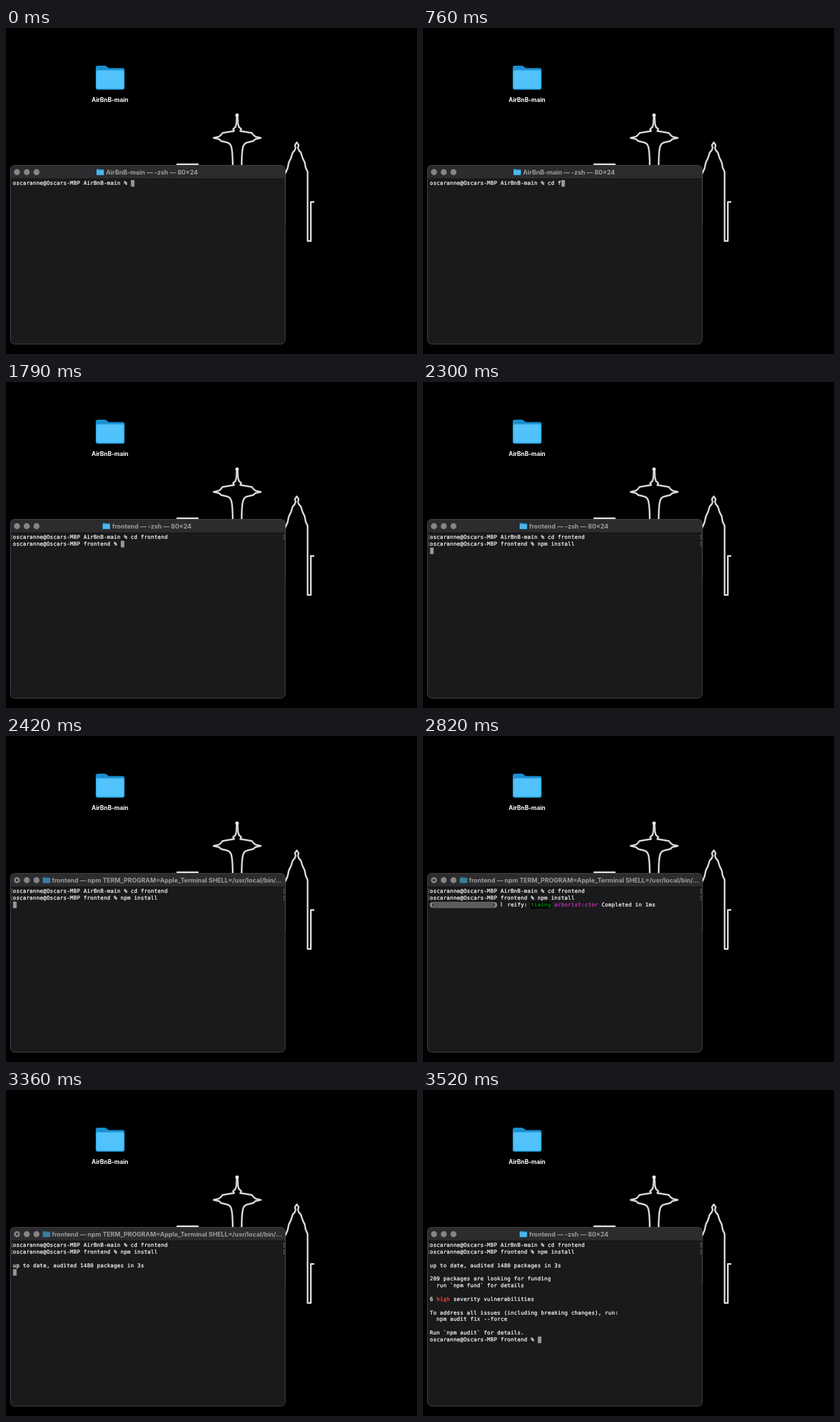
Recreate the animation shown at these times as an HTML page. Size 600 by 476 pixels, loop 3610 ms.

```html
<!DOCTYPE html>
<html lang="en">
<head>
<meta charset="utf-8">
<title>Terminal session</title>
<style>
  html, body { margin: 0; width: 100%; height: 100%; overflow: hidden; background: #000; }
  #stage { position: relative; width: 600px; height: 476px; overflow: hidden; background: #000; }
  svg { position: absolute; left: 0; top: 0; }
  .label, .title { font-family: Inter, sans-serif; font-weight: 700; }
  .label { font-size: 8.6px; fill: #fff; }
  .title { font-size: 9.15px; fill: #9d9c9e; }
  #screen span {
    position: absolute; white-space: pre; color: #fff;
    font: 7.8px/9.857px "DejaVu Sans Mono", monospace;
    letter-spacing: calc(4.915px - 1ch);
    -webkit-text-stroke: .22px currentColor;
  }
  #screen .mark { color: #7c7c7c; -webkit-text-stroke: 0; }
  #screen .bold { font-weight: 700; }
  #screen .red { color: #d23a2c; font-weight: 700; }
  #screen .green { color: #0a8f1c; background: #000; }
  #screen .pink { color: #cb32cb; }
  #screen .spin { font-family: "DejaVu Sans", sans-serif; letter-spacing: 0; }
  #cursor { fill: #979797; }
</style>
</head>
<body>
<div id="stage">
  <svg width="600" height="476" viewBox="0 0 600 476">
    <defs>
      <linearGradient id="front" x2="0" y2="1">
        <stop offset="0" stop-color="#53c3fb"/>
        <stop offset="1" stop-color="#4fc2fc"/>
      </linearGradient>
      <g id="folder">
        <path d="M0 3Q0 0 3 0H13Q15 0 16.5 1.500L17.500 2.500Q18.500 3.400 20 3.400H39Q42 3.400 42 6.400V32Q42 35 39 35H3Q0 35 0 32Z" fill="#1b8fd0"/>
        <rect x=".7" y="6.600" width="40.600" height="27.400" rx="2.600" fill="url(#front)" stroke="#2fa6e6" stroke-width="1.400"/>
      </g>
      <path id="half" d="M337 128L336.300 140L335 144.500L331.500 147.800L333 150.500L328 151.200L316 153.300L313.500 156.500L310.500 158.800L303 160.500L311 162.300L314 165L323 167.200Q328 168.500 329.300 175Q331 183 331 203"/>
      <g id="skyline">
        <use href="#half"/>
        <use href="#half" transform="matrix(-1 0 0 1 675 0)"/>
        <path d="M250 205V199H280V205"/>
        <path d="M407 214L411 205L413 196L416 190L418.500 182L421.500 178.500L422.800 175L421.800 171L424.500 167L427.200 171L426.200 175L427.500 178.500L430.500 182L433 190L436 196L437.500 204L440.300 210V311H445V254H450"/>
      </g>
    </defs>

    <g fill="none" stroke-linejoin="round">
      <use href="#skyline" stroke="#3a3a3a" stroke-width="3.400"/>
      <use href="#skyline" stroke="#e4e4e4" stroke-width="2"/>
    </g>
    <circle cx="337.300" cy="127.200" r="2.500" fill="#ececec"/>
    <path d="M408 285V212" stroke="#3c3c3c"/>

    <use href="#folder" x="131" y="55"/>
    <text class="label" x="151.800" y="107.800" text-anchor="middle">AirBnB-main</text>

    <rect x="6.500" y="200.500" width="401" height="261" rx="6" fill="#1a191b"/>
    <path d="M6.500 220V206.500Q6.500 200.500 12.500 200.500H401.500Q407.500 200.500 407.500 206.500V220Z" fill="#2c2b2d"/>
    <path d="M7 220.200H407" stroke="#0c0c0c" stroke-width=".6"/>
    <rect x="6.500" y="200.500" width="401" height="261" rx="6" fill="none" stroke="#414042"/>
    <g fill="#858486">
      <circle cx="16" cy="210.500" r="4.400"/>
      <circle cx="30.300" cy="210.500" r="4.400"/>
      <circle cx="44.500" cy="210.500" r="4.400"/>
    </g>
    <circle id="dot" cx="16" cy="210.500" r="1.700" fill="#29282a"/>
    <use id="icon" href="#folder"/>
    <text id="title" class="title" y="213.600"></text>

    <rect id="cursor" width="5.200" height="9.600"/>
    <g id="bar">
      <rect x="14.900" y="242" width="88.500" height="9.300" fill="#5c5c5c"/>
      <rect id="fill" x="14.900" y="242" height="9.300" fill="#e6e6e6"/>
      <path d="M12.700 242.800Q8.600 246.700 12.700 250.600M14.600 242.800Q10.600 246.700 14.600 250.600M105.600 242.800Q109.700 246.700 105.600 250.600M103.700 242.800Q107.700 246.700 103.700 250.600" fill="none" stroke="#fff" stroke-width=".9"/>
    </g>
  </svg>
  <div id="screen"></div>
</div>

<script>
const LOOP = 3610, CELL = 4.915, LINE = 9.857, LEFT = 10, TOP = 222;
const $ = id => document.getElementById(id);

const home = "oscaranne@Oscars-MBP AirBnB-main % ";
const sub = "oscaranne@Oscars-MBP frontend % ";

// text, icon x, text x
const titles = {
  home: ["AirBnB-main — -zsh — 80×24", 132, 146],
  sub: ["frontend — -zsh — 80×24", 141, 155],
  npm: ["frontend — npm TERM_PROGRAM=Apple_Terminal SHELL=/usr/local/bin/…", 53.7, 67]
};

const steps = [];
let state = { title: "home", marks: 0, lines: [home], runs: [], bar: null, dot: false };
const at = (t, change = {}) => {
  state = { ...state, ...change };
  steps.push({ t, ...state });
};
const type = (prompt, above, keys) =>
  keys.forEach(([t, text]) => at(t, { lines: [...above, prompt + text] }));

at(0);
type(home, [], [
  [240, "c"], [310, "cd"], [390, "cd "],
  [760, "cd f"], [810, "cd fr"], [860, "cd fro"], [910, "cd fron"],
  [970, "cd front"], [1020, "cd fronte"], [1070, "cd frontend/"]
]);
at(1120, { marks: 1 });

const first = home + "cd frontend";
at(1390, { lines: [first, ""] });
at(1420, { title: "sub", lines: [first, sub] });
type(sub, [first], [[1820, "n"], [1880, "npm i"], [1970, "npm install"]]);

const both = [first, sub + "npm install"];
at(2300, { marks: 2, lines: [...both, ""] });
at(2360, { title: "npm" });
at(2390, { dot: true });

const timing = (phase, task, time) => {
  const col = 23 + phase.length + 1;
  return [
    [23, 2, phase],
    [col, 2, "timing", "green"],
    [col + 7, 2, task, "pink"],
    [col + 8 + task.length, 2, "Completed in " + time]
  ];
};
at(2820, { bar: 0, runs: timing("reify:", "arborist:ctor", "1ms") });
at(3330, { bar: 9, runs: timing("idealTree:", "idealTree", "967ms") });

const report = [
  "", "up to date, audited 1480 packages in 3s", "",
  "209 packages are looking for funding", "  run `npm fund` for details", "",
  "6      severity vulnerabilities", "",
  "To address all issues (including breaking changes), run:", "  npm audit fix --force", "",
  "Run `npm audit` for details."
];
at(3360, { bar: null, runs: [], lines: [...both, ...report.slice(0, 2), ""] });
at(3420, { lines: [...both, ...report, ""], runs: [[2, 8, "high", "red"]] });
at(3460, { title: "sub", dot: false });
at(3520, { lines: [...both, ...report, sub] });

function put(col, row, text, kind = "") {
  const span = document.createElement("span");
  span.className = kind;
  span.textContent = text;
  span.style.left = LEFT + col * CELL + "px";
  span.style.top = TOP + row * LINE + "px";
  $("screen").append(span);
  return span;
}

let spinner = null;

function show(s) {
  const [text, iconX, textX] = titles[s.title];
  $("title").textContent = text;
  $("title").setAttribute("x", textX);
  $("icon").setAttribute("transform", `translate(${iconX} 205.700) scale(.26)`);
  $("icon").setAttribute("opacity", s.dot ? .55 : .92);
  $("dot").style.display = s.dot ? "" : "none";

  $("screen").replaceChildren();
  s.lines.forEach((line, row) => {
    const slash = line.endsWith("/");
    put(0, row, slash ? line.slice(0, -1) : line);
    if (slash) put(line.length - 1, row, "/", "bold");
  });
  for (let row = 0; row < s.marks; row++) {
    put(-.75, row, "[", "mark");
    put(80, row, "]", "mark");
  }
  s.runs.forEach(run => put(...run));

  const busy = s.bar !== null;
  spinner = busy ? put(20.9, 2, "", "spin") : null;
  $("bar").style.display = busy ? "" : "none";
  $("fill").setAttribute("width", (s.bar || 0) * CELL);

  const last = s.lines.length - 1;
  $("cursor").style.display = busy ? "none" : "";
  $("cursor").setAttribute("x", LEFT + .3 + s.lines[last].length * CELL);
  $("cursor").setAttribute("y", TOP + last * LINE);
}

let shown = null;
const start = performance.now();

function tick() {
  const t = Math.max(0, performance.now() - start) % LOOP;
  const step = steps.findLast(s => s.t <= t);
  if (step !== shown) show(shown = step);
  if (spinner) spinner.textContent = "⠋⠙⠹⠸⠼⠴⠦⠧⠇⠏"[(8 + Math.floor((t - 2820) / 46)) % 10];
  requestAnimationFrame(tick);
}
tick();
</script>
</body>
</html>
```
